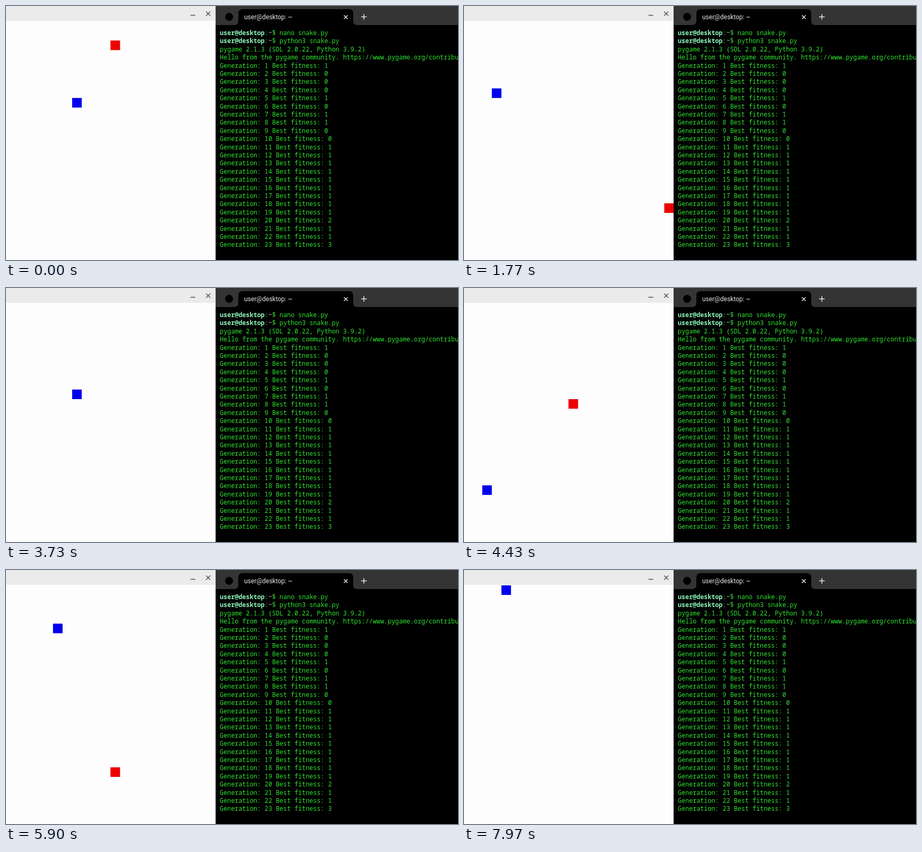
An HTML page that plays this animation: 854 by 480 pixels, repeating every 8000 ms.

```html
<!DOCTYPE html>
<html lang="en">
<head>
<meta charset="utf-8">
<title>Snake training</title>
<style>
  html, body { margin: 0; width: 100%; height: 100%; overflow: hidden; background: #000; }
  svg { display: block; width: 854px; height: 480px; }
  .mono { font: 11.76px "Noto Sans Mono", monospace; fill: #30e430; white-space: pre; }
  .user { font-weight: 700; fill: #90f8c0; }
  .path { fill: #c8d4e4; }
  .tab { font: 12px Roboto, sans-serif; fill: #e8e8e8; }
  .line { fill: none; stroke-width: 1.5; }
</style>
</head>
<body>
<svg viewBox="0 0 854 480">
  <rect width="854" height="480"/>
  <rect x="396" width="458" height="36" fill="#343434"/>
  <path d="M431 36q8 0 8-8V14q0-8 8-8H648q8 0 8 8V28q0 8 8 8z"/>
  <circle cx="421.5" cy="20.5" r="7.5"/>
  <text class="tab" x="450" y="25">user@desktop: ~</text>
  <path class="line" stroke="#e8e8e8" d="M638.5 17.5l7 7m0-7l-7 7M671 20.5h10.5m-5.25-5.25v10.5"/>
  <g id="terminal"></g>
  <rect x="404.5" y="460.5" width="6" height="13" fill="none" stroke="#5878a0"/>

  <rect width="396" height="480" fill="#fdfdfd"/>
  <rect id="food" width="18.1" height="18.1" fill="#0000ee"/>
  <rect id="snake" width="18.1" height="18.1" fill="#ec0000"/>
  <rect x="396" y="36" width="22" height="444"/>
  <rect width="396" height="28" fill="#ebebeb"/>
  <path class="line" stroke="#505050" d="M348.5 17.5h9M378 10.5l8 8m0-8l-8 8"/>
</svg>
<script>
const CELL = 18.1, LEFT = -1.7, TOP = 29;
const START = [11, 14];
const STEPS_PER_MS = 0.03, LOOP = 8000;
const DIRS = { U: [0, -1], D: [0, 1], L: [-1, 0], R: [1, 0] };

// Each round: food column, food row, moves of the snake until it hits a wall.
const rounds = [
  [7, 8, 'U14'], [5, 16, 'U9R10'], [16, 5, 'U14'], [3, 7, 'D5R10'],
  [18, 9, 'U1L14'], [12, 4, 'L14'], [6, 17, 'D2R10'], [7, 9, 'L14'],
  [15, 6, 'D5R10'], [2, 19, 'U5R10'], [11, 3, 'D1L14'], [9, 12, 'R10'],
  [5, 4, 'D5R10'], [14, 7, 'U14'], [17, 10, 'U1L14'], [4, 0, 'U8L12'],
];

let nextStart = -12;
const games = rounds.map(([col, row, moves]) => {
  const path = [START];
  for (const [, dir, count] of moves.matchAll(/([UDLR])(\d+)/g)) {
    for (let i = 0; i < +count; i++) {
      const [x, y] = path[path.length - 1];
      path.push([x + DIRS[dir][0], y + DIRS[dir][1]]);
    }
  }
  const game = { food: [col, row], path, start: nextStart };
  nextStart += path.length;
  return game;
});

const prompt = '<tspan class="user">user@desktop</tspan>:<tspan class="path">~</tspan>$ ';
const lines = [
  prompt + 'nano snake.py',
  prompt + 'python3 snake.py',
  'pygame 2.1.3 (SDL 2.0.22, Python 3.9.2)',
  'Hello from the pygame community. https://www.pygame.org/contribute.html',
  ...[...'10001011001111111112113'].map((best, i) => `Generation: ${i + 1} Best fitness: ${best}`),
];
const terminal = document.getElementById('terminal');
terminal.innerHTML = lines
  .map((line, i) => `<text class="mono" x="404" y="${(55 + i * 15.4).toFixed(1)}">${line}</text>`)
  .join('');
// The terminal window lies in front of the game board.
terminal.parentNode.append(terminal);

const food = document.getElementById('food');
const snake = document.getElementById('snake');

function place(rect, [col, row]) {
  rect.setAttribute('x', LEFT + col * CELL);
  rect.setAttribute('y', TOP + row * CELL);
}

function draw(time) {
  const step = Math.floor((time % LOOP + 5) * STEPS_PER_MS);
  const game = games.findLast(g => g.start <= step);
  place(food, game.food);
  place(snake, game.path[Math.min(step - game.start, game.path.length - 1)]);
}

let origin;
function tick(now) {
  origin ??= now;
  draw(now - origin);
  requestAnimationFrame(tick);
}
draw(0);
requestAnimationFrame(tick);
</script>
</body>
</html>
```
